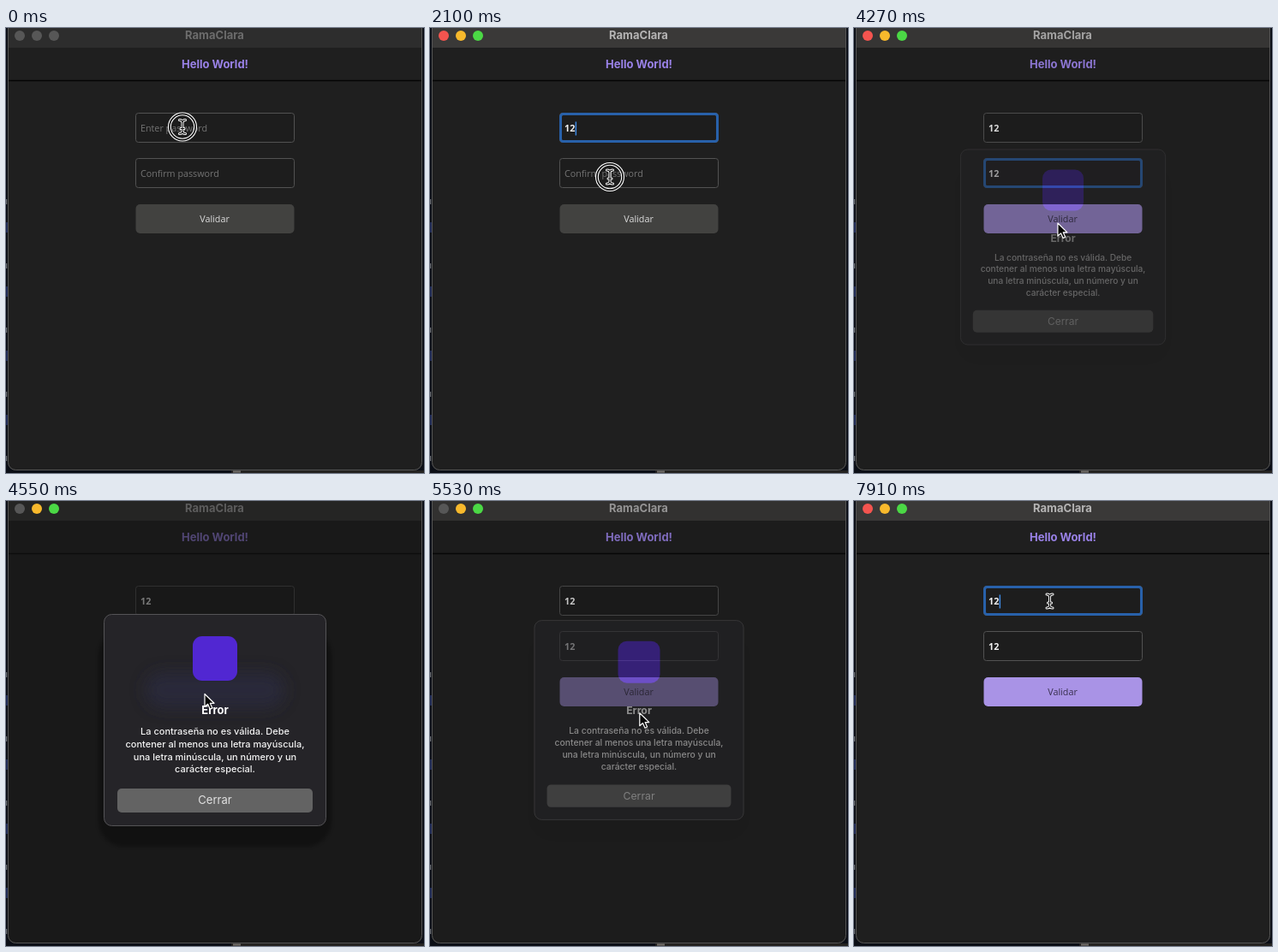
An HTML page that plays this animation: 488x520 px, repeating every 8000 ms.

```html
<!DOCTYPE html>
<html lang="es">
<head>
<meta charset="utf-8">
<title>RamaClara</title>
<style>
  html, body { margin: 0; width: 100%; height: 100%; overflow: hidden; background: #0b0e16; }
  svg { display: block; width: 488px; height: 520px; }
  .ui { font-family: Inter, "Liberation Sans", sans-serif; font-size: 13px; text-anchor: middle; }
  .form { font-family: "Open Sans", "Noto Sans", sans-serif; font-size: 10.75px; }
  .bold { font-weight: 700; }
  .hint { fill: #747474; }
  .value { fill: #f2f2f2; font-weight: 700; }
</style>
</head>
<body>
<svg viewBox="0 0 488 520" xmlns="http://www.w3.org/2000/svg">
  <defs>
    <filter id="soft" x="-30%" y="-30%" width="160%" height="160%"><feGaussianBlur stdDeviation="2"/></filter>
    <filter id="haze" x="-30%" y="-60%" width="160%" height="220%"><feGaussianBlur stdDeviation="9"/></filter>
    <clipPath id="frame"><rect x="2" y="-20" width="484" height="537" rx="9"/></clipPath>
    <path id="beamShape" d="M-3.5-8Q0-8 0-5V5Q0 8-3.5 8M3.5-8Q0-8 0-5V5Q0 8 3.5 8M-2 2H2" fill="none" stroke-linecap="round"/>
  </defs>

  <rect width="488" height="520" fill="#0b0e16"/>
  <g id="specks"></g>
  <path d="M263 517H488V520H263Z" fill="#242220"/>
  <path d="M265 518.5H274" stroke="#77736f" stroke-width="2"/>

  <g clip-path="url(#frame)">
    <rect width="488" height="520" fill="#1f1f1f"/>
    <rect id="bar" width="488" height="23"/>
    <path d="M0 61.5H488" stroke="#050505" stroke-width="1.3"/>
    <text id="title" class="ui bold" x="243.5" y="13">RamaClara</text>
    <text class="ui bold" x="244" y="46.5" fill="#9a82e8">Hello World!</text>
    <g id="fields" class="form"></g>
    <rect id="button" x="151.5" y="206" width="185" height="34" rx="5"/>
    <text id="buttonText" class="form" x="243.5" y="227.3" text-anchor="middle">Validar</text>
    <rect id="dim" width="488" height="520" fill="#141414"/>
    <g id="lights"></g>
  </g>
  <rect x="2.5" y="-20" width="483" height="536.5" rx="9" fill="none" stroke="#555"/>

  <g id="dialog">
    <rect id="shadow" x="108" y="150" width="272" height="254" rx="30" fill="#000" filter="url(#soft)"/>
    <rect x="114.5" y="132.5" width="259" height="247" rx="9" fill="#252428" stroke="#545356"/>
    <rect id="glow" x="163" y="200" width="162" height="42" rx="20" fill="#2c2940" filter="url(#haze)"/>
    <rect x="218" y="158" width="52" height="52" rx="11" fill="#5127d2"/>
    <text class="ui bold" x="244" y="249" fill="#fff">Error</text>
    <g id="message" class="ui" fill="#f4f4f4" style="font-size:11px;font-weight:500"></g>
    <rect x="130" y="336" width="228" height="28" rx="5" fill="#636363"/>
    <text class="ui" x="244" y="354.3" fill="#e2e2e2">Cerrar</text>
  </g>

  <g id="pointer">
    <g id="ring" fill="none">
      <circle id="ringGap" stroke="#111"/>
      <circle id="ringOuter" stroke="#fff" stroke-width="1.1"/>
      <circle id="ringInner" stroke="#fff" stroke-width="1.1"/>
    </g>
    <g id="beam">
      <use href="#beamShape" stroke="#fff" stroke-width="3"/>
      <use href="#beamShape" stroke="#111" stroke-width="1.1"/>
    </g>
    <path id="arrow" d="M0 .5V15.5L3.6 12.3 6.2 18 8.8 16.8 6.3 11.3H11Z" fill="#050505" stroke="#fff" stroke-width="1.2" stroke-linejoin="round"/>
  </g>
</svg>
<script>
const LOOP = 8000;
const $ = id => document.getElementById(id);
const set = (el, attrs) => { for (const k in attrs) el.setAttribute(k, attrs[k]); };
const add = (parent, tag, attrs, text = '') => {
  const el = document.createElementNS('http://www.w3.org/2000/svg', tag);
  set(el, attrs);
  el.textContent = text;
  return parent.appendChild(el);
};
const show = (el, on) => set(el, { visibility: on ? 'visible' : 'hidden' });
const between = (t, from, to) => t >= from && t < to;
const ramp = (t, start, length) => Math.min(1, Math.max(0, (t - start) / length));
const smooth = p => p * p * (3 - 2 * p);

const ACTIVATE = 70, READY = 2800, OPEN = 4200, CLOSE = 5390;
const FOCUS_FADE = 140;
const TO_ARROW = 2420, TO_BEAM = 6580;
const clicks = [0, 2100, 3850, 5180, 6090];

const home = { x: 206, y: 115.5 };
const moves = [
  { at: 420, until: 840, x: 204, y: 134 },
  { at: 1050, until: 1260, x: 203, y: 139 },
  { at: 1540, until: 1890, x: 210, y: 174 },
  { at: 2240, until: 2520, x: 222, y: 197 },
  { at: 2660, until: 3080, x: 242, y: 229 },
  { at: 3360, until: 3570, x: 239, y: 228 },
  { at: 4200, until: 4480, x: 232, y: 225 },
  { at: 4690, until: 4900, x: 257, y: 340 },
  { at: 5320, until: 5800, x: 227, y: 112 },
  { at: TO_BEAM - 70, until: TO_BEAM, x: 228.5, y: 117 }
];

const fields = [
  { y: 100, hint: 'Enter password', typed: [1680, 1820], focus: [[ACTIVATE, 2170], [6650, LOOP]] },
  { y: 153, hint: 'Confirm password', typed: [READY, READY + 40], focus: [[2170, 4270], [5880, 6580]] }
];

for (const f of fields) {
  const g = $('fields'), text = { x: 157, y: f.y + 21.3 };
  add(g, 'rect', { x: 151.5, y: f.y - .5, width: 185, height: 34, rx: 3, fill: '#1d1d1d', stroke: '#525252' });
  f.ring = add(g, 'rect', { x: 152.5, y: f.y + .5, width: 183, height: 32, rx: 3, fill: 'none', stroke: '#2861aa', 'stroke-width': 3 });
  f.hintText = add(g, 'text', { ...text, class: 'hint' }, f.hint);
  f.valueText = add(g, 'text', { ...text, class: 'value' });
  f.caret = add(g, 'rect', { y: f.y + 9.5, width: 1.5, height: 16, fill: '#3b86de' });
}

const lights = ['#f4544f', '#f8b92c', '#4bd845'].map((color, i) =>
  ({ color, dot: add($('lights'), 'circle', { cx: 16 + i * 20, cy: 9, r: 6 }) }));

['La contraseña no es válida. Debe', 'contener al menos una letra mayúscula,',
 'una letra minúscula, un número y un', 'carácter especial.']
  .forEach((line, i) => add($('message'), 'text', { x: 244, y: 273 + i * 14.8 }, line));

// Slivers of the text lines behind the window's left edge.
for (let i = 0; i <= 20; i++) {
  const y = 203 + i * 15;
  if (i % 5 === 0) add($('specks'), 'rect', { x: 0, y: y - 3, width: 1.2, height: 6, fill: '#6a6d72' });
  if (i % 5 === 2) add($('specks'), 'rect', { x: 0, y: y - 6, width: 2, height: 12, fill: '#1f2a55' });
}

// Caret opacity for the time since it last appeared or moved.
function blink(age) {
  const p = age % 1060;
  return 1 - ramp(p, 530, 180) + ramp(p, 880, 180);
}

function drawField(f, t) {
  const count = f.typed.filter(at => t >= at).length;
  const span = f.focus.find(([from, to]) => between(t, from, to));
  const glow = f.focus.reduce((sum, [from, to]) =>
    sum + ramp(t, from, FOCUS_FADE) - ramp(t, to, FOCUS_FADE), 0);
  let caret = 0;
  if (span) {
    const resets = [span[0] + FOCUS_FADE, ...f.typed].filter(at => at <= t);
    caret = resets.length ? blink(t - Math.max(...resets)) : 1;
  }
  f.valueText.textContent = '12'.slice(0, count);
  show(f.hintText, !count);
  set(f.ring, { opacity: glow });
  set(f.caret, { x: 157 + count * 6.3, opacity: caret });
}

function drawDialog(t) {
  const p = ramp(t, OPEN, 210) - ramp(t, CLOSE, 280);
  const depth = ramp(p, .5, .5);
  const scale = .885 + .115 * p;
  set($('dim'), { opacity: .55 * p ** 1.5 });
  set($('shadow'), { opacity: .04 + .26 * depth });
  set($('glow'), { opacity: .75 * depth });
  set($('dialog'), {
    opacity: p,
    transform: `translate(244.3 256) scale(${scale}) translate(-244.3 -256)`
  });
}

function drawPointer(t) {
  let { x, y } = home;
  for (const m of moves) {
    const p = smooth(ramp(t, m.at, m.until - m.at));
    x += (m.x - x) * p;
    y += (m.y - y) * p;
  }
  const beam = !between(t, TO_ARROW, TO_BEAM);
  set($('pointer'), { transform: `translate(${x} ${y})` });
  show($('beam'), beam);
  show($('arrow'), !beam);

  const start = clicks.find(c => between(t, c, c + 140));
  show($('ring'), start !== undefined);
  const r = t - start < 70 ? 16.5 : 21.5, inner = r * .83;
  set($('ringOuter'), { r });
  set($('ringInner'), { r: inner });
  set($('ringGap'), { r: (r + inner) / 2, 'stroke-width': r - inner });
}

function draw(t) {
  const active = t >= ACTIVATE, ready = t >= READY;
  set($('bar'), { fill: active ? '#3a3938' : '#2d2d2d' });
  set($('title'), { fill: active ? '#b5b4b4' : '#6c6c6c' });
  lights.forEach(({ color, dot }, i) => {
    const off = !active || (i === 0 && between(t, OPEN + 140, CLOSE + 350));
    set(dot, { fill: off ? '#575757' : color });
  });
  set($('button'), { fill: ready ? '#a993e6' : '#424240' });
  set($('buttonText'), { fill: ready ? '#382f4e' : '#dcdcdc' });
  fields.forEach(f => drawField(f, t));
  drawDialog(t);
  drawPointer(t);
}

let began;
function tick(now) {
  began ??= now;
  draw((now - began) % LOOP);
  requestAnimationFrame(tick);
}
draw(0);
requestAnimationFrame(tick);
</script>
</body>
</html>
```
